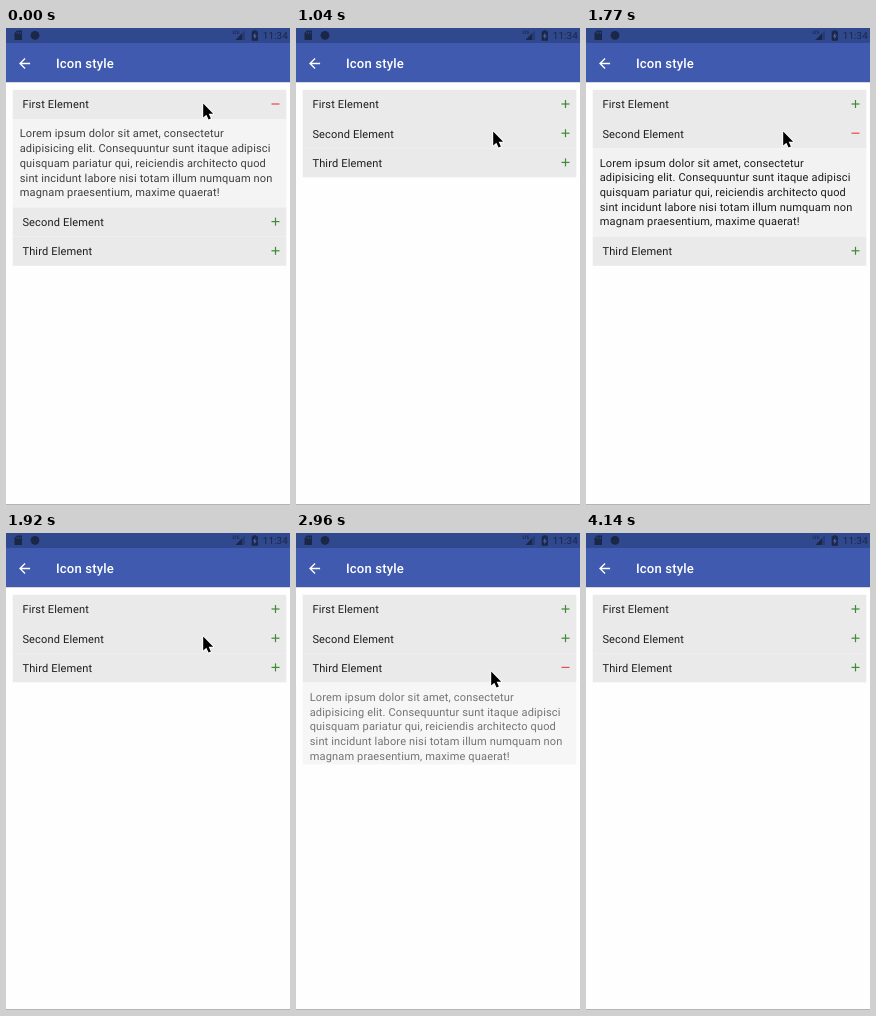
Animation, 284 px wide and 477 px high, one loop 4610 ms. Source, as an HTML page with a canvas:

```html
<!DOCTYPE html>
<html lang="en">
<head>
<meta charset="utf-8">
<title>Icon style</title>
<style>
  html, body { margin: 0; width: 100%; height: 100%; overflow: hidden; background: #fefefe; }
  canvas { display: block; width: 284px; height: 477px; }
</style>
</head>
<body>
<canvas id="stage"></canvas>
<script>
const W = 284, H = 477, LOOP = 4610;
const TICK = 147.25; // the picture advances in steps of this many ms
const canvas = document.getElementById('stage');
const ctx = canvas.getContext('2d');
const dpr = window.devicePixelRatio || 1;
canvas.width = W * dpr;
canvas.height = H * dpr;

const LEFT = 6.7, TOP = 61.8, WIDTH = 273.6;
const ROW = 29.2, BODY = 88.4, LAST_BODY = 82;
const INK = '#1c1c1c', DARK = '#1b2747', STATUS = '#30488d';
const RED = '#ec4a4a', GREEN = '#3f8a35';

const ROWS = [
  { title: 'First Element', opens: -2, closes: 3 },
  { title: 'Second Element', opens: 9, closes: 13 },
  { title: 'Third Element', opens: 19, closes: 23 }
];
const LOREM = [
  'Lorem ipsum dolor sit amet, consectetur',
  'adipisicing elit. Consequuntur sunt itaque adipisci',
  'quisquam pariatur qui, reiciendis architecto quod',
  'sint incidunt labore nisi totam illum numquam non',
  'magnam praesentium, maxime quaerat!'
];

const HOME = { x: 196, y: 75 };
const MOVES = [
  { from: 6, ticks: 2, x: 196, y: 103 },
  { from: 15, ticks: 3, x: 194, y: 138 },
  { from: 25, ticks: 1, x: 206, y: 184 },
  { from: 26, ticks: 1, x: 246, y: 431 }
];
const POINTER_GONE = 28;

const BACK = new Path2D('M20 11H7.83l5.59-5.59L12 4l-8 8 8 8 1.41-1.41L7.83 13H20z');
const POINTER = new Path2D('M0 0V14.6L3.3 11.5L5.6 16.6L8 15.6L5.7 10.6H10.4Z');

const clamp = v => Math.min(1, Math.max(0, v));
const easeOut = u => 1 - (1 - u) ** 2;

function rect(x, y, w, h, fill) {
  ctx.fillStyle = fill;
  ctx.fillRect(x, y, w, h);
}

function poly(fill, ...pts) {
  ctx.fillStyle = fill;
  ctx.beginPath();
  for (let i = 0; i < pts.length; i += 2) ctx.lineTo(pts[i], pts[i + 1]);
  ctx.fill();
}

function text(str, x, y, fill, size = 11.04, weight = 400, gap = 0.15) {
  ctx.font = `${weight} ${size}px Roboto, sans-serif`;
  ctx.letterSpacing = gap + 'px';
  ctx.textRendering = 'geometricPrecision';
  ctx.fillStyle = fill;
  ctx.fillText(str, x, y);
}

function drawStatusBar() {
  rect(0, 0, W, 15, STATUS);
  // memory card
  poly(DARK, 8.5, 5, 11, 2.5, 16, 2.5, 16, 12, 8.5, 12);
  for (let i = 0; i < 3; i++) rect(10.6 + i * 1.7, 3.8, 0.8, 2, STATUS);
  // notification
  ctx.fillStyle = DARK;
  ctx.beginPath();
  ctx.arc(29, 7.3, 4.4, 0, 2 * Math.PI);
  ctx.fill();
  // signal
  text('LTE', 226.5, 6.2, DARK, 4.6, 500, -0.2);
  poly('#273b75', 239, 2.5, 239, 12, 229.5, 12);
  poly(DARK, 236, 5.5, 236, 12, 229.5, 12);
  // battery
  rect(247.3, 2.3, 3, 1.5, DARK);
  rect(245.7, 3.3, 6.2, 9.4, DARK);
  poly('#4a63a8', 249.4, 4.6, 246.9, 8.6, 248.5, 8.6, 248.3, 11.4, 250.8, 7.4, 249.2, 7.4);
  text('11:34', 256.8, 11.2, DARK, 9.9, 400, 0.1);
}

function drawHeader() {
  rect(0, 15, W, 39, '#3f5aae');
  rect(0, 54, W, 1, 'rgba(0, 0, 0, 0.15)');
  ctx.save();
  ctx.translate(10.3, 27.2);
  ctx.scale(0.69, 0.69);
  ctx.fillStyle = '#fff';
  ctx.fill(BACK);
  ctx.restore();
  text('Icon style', 50, 40, '#fff', 13.1, 500);
}

function drawRow(title, y, open) {
  rect(LEFT, y, WIDTH, ROW, '#ebeaeb');
  text(title, 16.4, y + 18.6, INK);
  const cy = y + 14.2;
  rect(265.5, cy - 0.6, 8, 1.2, open ? RED : GREEN);
  if (!open) rect(268.9, cy - 4, 1.2, 8, GREEN);
}

function drawBody(y, height, alpha) {
  ctx.globalAlpha = alpha;
  rect(LEFT, y, WIDTH, height, '#f2f2f2');
  LOREM.forEach((line, n) => text(line, 13.7, y + 18.45 + n * 14.7, INK));
  ctx.globalAlpha = 1;
}

function drawAccordion(tick) {
  let y = TOP;
  ROWS.forEach(({ title, opens, closes }, i) => {
    const open = tick >= opens && tick < closes;
    drawRow(title, y, open);
    y += ROW;
    if (!open) return;
    const height = i < ROWS.length - 1 ? BODY : LAST_BODY;
    drawBody(y, height, clamp(0.36 + 0.24 * (tick - opens)));
    y += height;
  });
}

function drawPointer(tick) {
  if (tick >= POINTER_GONE) return;
  let { x, y } = HOME;
  for (const move of MOVES) {
    const k = easeOut(clamp((tick - move.from + 1) / move.ticks));
    x += (move.x - x) * k;
    y += (move.y - y) * k;
  }
  ctx.save();
  ctx.translate(x + 1.2, y + 0.6);
  ctx.scale(0.96, 0.96);
  ctx.lineJoin = 'round';
  ctx.lineWidth = 2;
  ctx.strokeStyle = '#fff';
  ctx.stroke(POINTER);
  ctx.fillStyle = '#000';
  ctx.fill(POINTER);
  ctx.restore();
}

function draw(ms) {
  const tick = Math.floor(ms / TICK);
  ctx.setTransform(dpr, 0, 0, dpr, 0, 0);
  rect(0, 0, W, H, '#fefefe');
  drawStatusBar();
  drawHeader();
  drawAccordion(tick);
  rect(0, 476, W, 1, '#b4b4b4');
  drawPointer(tick);
}

const start = performance.now();
function loop() {
  draw((performance.now() - start) % LOOP);
  requestAnimationFrame(loop);
}
loop();
</script>
</body>
</html>
```
